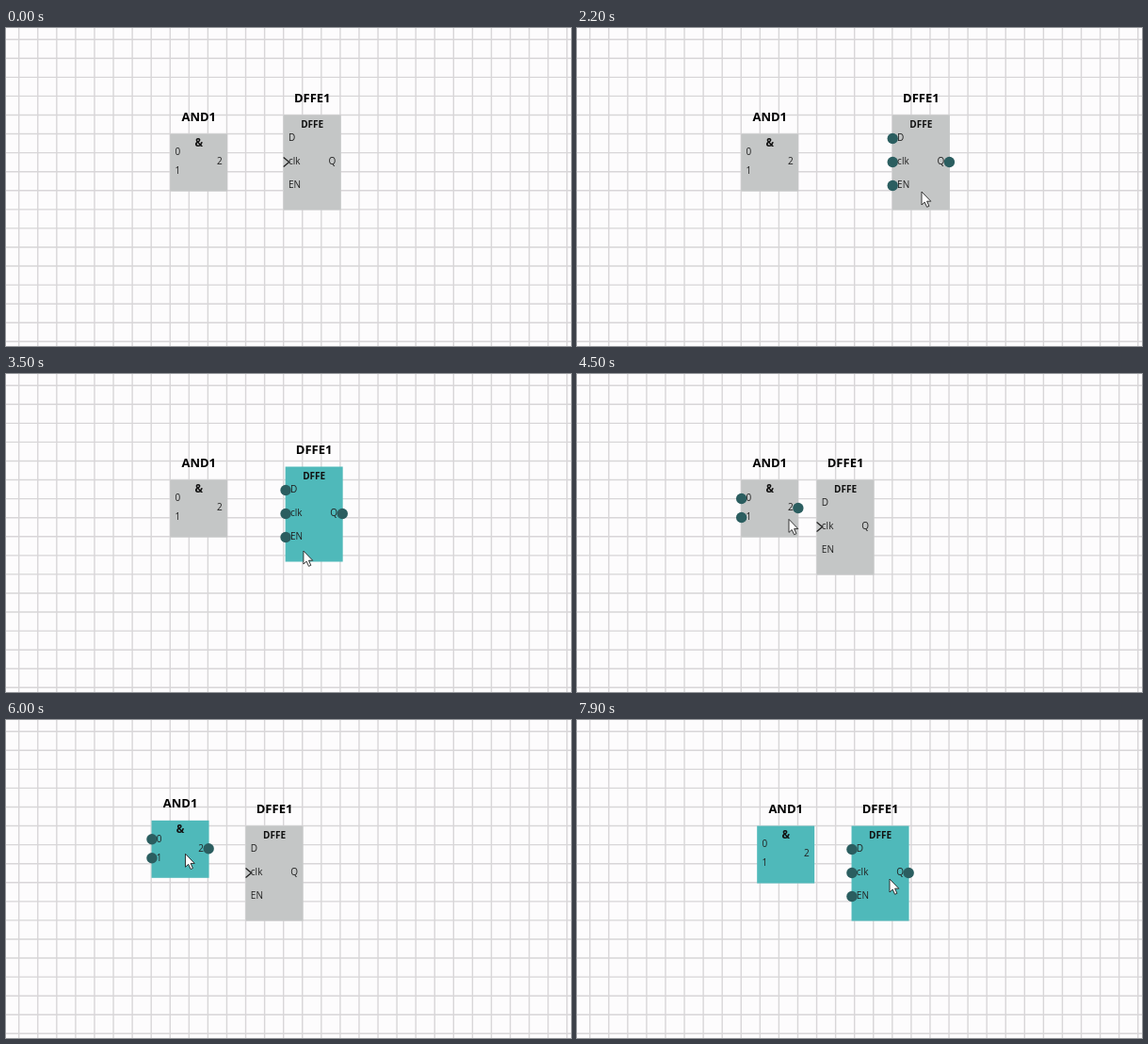
Animation of 600 by 338 pixels, one loop 8000 ms. Source, as an HTML page:

```html
<!DOCTYPE html>
<html lang="en">
<head>
<meta charset="utf-8">
<title>Logic block editor</title>
<style>
  html, body { margin: 0; width: 100%; height: 100%; overflow: hidden; background: #fdfcfd; }
  svg { display: block; width: 600px; height: 338px; }
  text { font: 10px "Open Sans", "Noto Sans", sans-serif; fill: #222; }
  .title { font-size: 13px; font-weight: 700; fill: #000; text-anchor: middle; }
  .kind { font-weight: 700; fill: #111; text-anchor: middle; }
  .amp { font-size: 11.5px; }
  .out { text-anchor: end; }
  .body { fill: #c4c6c6; }
  .selected .body { fill: #4fb9ba; }
  .port { fill: #2b5e60; visibility: hidden; }
  .hovered .port { visibility: visible; }
  .clock { fill: none; stroke: #222; stroke-width: 1.3; }
  .hovered .clock { visibility: hidden; }
</style>
</head>
<body>
<svg viewBox="0 0 600 338">
  <path id="grid" stroke="#d8d6d8" stroke-width="1.4"/>
  <g id="blocks"></g>
  <rect id="band" fill="#0078d7" fill-opacity=".12" stroke="#0078d7" stroke-opacity=".6"/>
  <path id="cursor" d="M0 0V14L3.2 11.1L5.6 16.3L7.9 15.3L5.6 10.2H9.8Z" fill="#fff" stroke="#222" stroke-width=".9" stroke-linejoin="round"/>
</svg>
<script>
const LOOP = 8000, STEP = 100, CELL = 20.07, LEFT = 13.7, TOP = 12.2, WIDTH = 61;
const $ = id => document.getElementById(id);
const gridX = col => LEFT + col * CELL;
const gridY = row => TOP + row * CELL;
const snap = ([x, y]) => [
  gridX(Math.round((x - LEFT) / CELL)),
  gridY(Math.round((y - TOP) / CELL))
];
const ease = k => k ** 3 * (10 + k * (6 * k - 15));

const label = (name, x, y, cls = "") => `<text class="${cls}" x="${x}" y="${y}">${name}</text>`;
const port = (x, y) => `<circle class="port" cx="${x}" cy="${y}" r="5.7"/>`;

function makeBlock({ title, kind, kindClass = "", height, inputs, gap, outY, output, clocked, col, row }) {
  const el = document.createElementNS("http://www.w3.org/2000/svg", "g");
  const mid = WIDTH / 2;
  const pins = inputs.map((name, i) => {
    const y = gap * (i + 1);
    return port(0.4, y) + label(name, 5.3, y + 2.9);
  }).join("");
  el.innerHTML = `<rect class="body" width="${WIDTH}" height="${height}"/>`
    + label(title, mid, -13.6, "title")
    + label(kind, mid, 13.5, "kind " + kindClass)
    + (clocked ? `<path class="clock" d="M0 ${outY - 5}l6 5l-6 5"/>` : "")
    + pins + port(WIDTH - 0.4, outY) + label(output, 55.5, outY + 2.9, "out");
  $("blocks").append(el);
  return { el, height, home: [gridX(col), gridY(row)] };
}

const gate = makeBlock({
  title: "AND1", kind: "&amp;", kindClass: "amp", height: 61,
  inputs: ["0", "1"], gap: 20, output: "2", outY: 30, col: 8, row: 5
});
const flop = makeBlock({
  title: "DFFE1", kind: "DFFE", height: 101, clocked: true,
  inputs: ["D", "clk", "EN"], gap: 25, output: "Q", outY: 50, col: 14, row: 4
});
const blocks = [gate, flop];

// The cursor glides to (x, y); dragged blocks follow it and snap to the grid on drop.
const move = (start, end, x, y) => ({ start, end, x, y, drop: end, dragged: [] });
const drag = (dragged, start, end, x, y, drop, lift = 0) => ({ start, end, x, y, drop, dragged, lift });
const select = (start, end, x, y, drop) => ({ ...move(start, end, x, y), drop, band: true });

const ENTRY = { time: 500, x: 362, y: 294 };
const gestures = [
  move(500, 900, 334, 172),
  drag([flop], 1000, 1600, 368, 172, 1900, 3),
  move(1900, 2200, 366, 174),
  drag([flop], 2300, 2600, 347, 179, 2900),
  move(2900, 3200, 334, 182),
  drag([flop], 3300, 3800, 277, 201, 4200),
  move(4200, 4600, 219, 149),
  drag([gate], 4700, 5000, 165, 149, 5300),
  move(5300, 5500, 150, 148),
  drag([gate], 5600, 6100, 193, 145, 6300, 5),
  move(6300, 6800, 138, 92),
  move(6800, 6900, 123.5, 64.5),
  select(6900, 7100, 378, 217, 7300),
  move(7300, 7500, 295, 169),
  drag(blocks, 7500, 7900, 332, 169, LOOP)
];

// Replays every gesture begun by time t.
function stateAt(t) {
  let { x, y } = ENTRY, band = null;
  const selected = new Set();
  const places = new Map(blocks.map(b => [b, b.home]));
  for (const g of gestures) {
    if (t < g.start) break;
    const k = Math.min(1, (t - g.start) / (g.end - g.start));
    const dx = (g.x - x) * ease(k);
    const dy = (g.y - y) * ease(k) - (g.lift || 0) * Math.sin(Math.PI * k);
    const dropped = t >= g.drop;
    if (g.band) {
      if (k > 0) blocks.forEach(b => selected.add(b));
      if (!dropped) band = { x, y, width: dx, height: dy };
    }
    for (const block of g.dragged) {
      const [bx, by] = places.get(block);
      const place = [bx + dx, by + dy];
      places.set(block, dropped ? snap(place) : place);
      if (dropped) selected.delete(block);
      else selected.add(block);
    }
    x += dx;
    y += dy;
  }
  return { x, y, band, selected, places };
}

const place = (el, x, y) => el.setAttribute("transform", `translate(${x} ${y})`);
const show = (el, on) => el.setAttribute("visibility", on ? "visible" : "hidden");

function draw(t) {
  const { x, y, band, selected, places } = stateAt(t);
  const pointing = t >= ENTRY.time;
  for (const block of blocks) {
    const [bx, by] = places.get(block);
    const inside = x >= bx && x <= bx + WIDTH && y >= by && y <= by + block.height;
    place(block.el, bx, by);
    block.el.classList.toggle("selected", selected.has(block));
    block.el.classList.toggle("hovered", pointing && inside && !band);
  }
  place($("cursor"), x, y);
  show($("cursor"), pointing);
  show($("band"), band);
  for (const key in band) $("band").setAttribute(key, band[key]);
}

let lines = "";
for (let x = LEFT; x < 600; x += CELL) lines += `M${x} 0V338`;
for (let y = TOP; y < 338; y += CELL) lines += `M0 ${y}H600`;
$("grid").setAttribute("d", lines);

const start = performance.now();
function tick(now) {
  const t = Math.max(0, now - start) % LOOP;
  draw(Math.floor(t / STEP) * STEP);
  requestAnimationFrame(tick);
}
draw(0);
requestAnimationFrame(tick);
</script>
</body>
</html>
```
